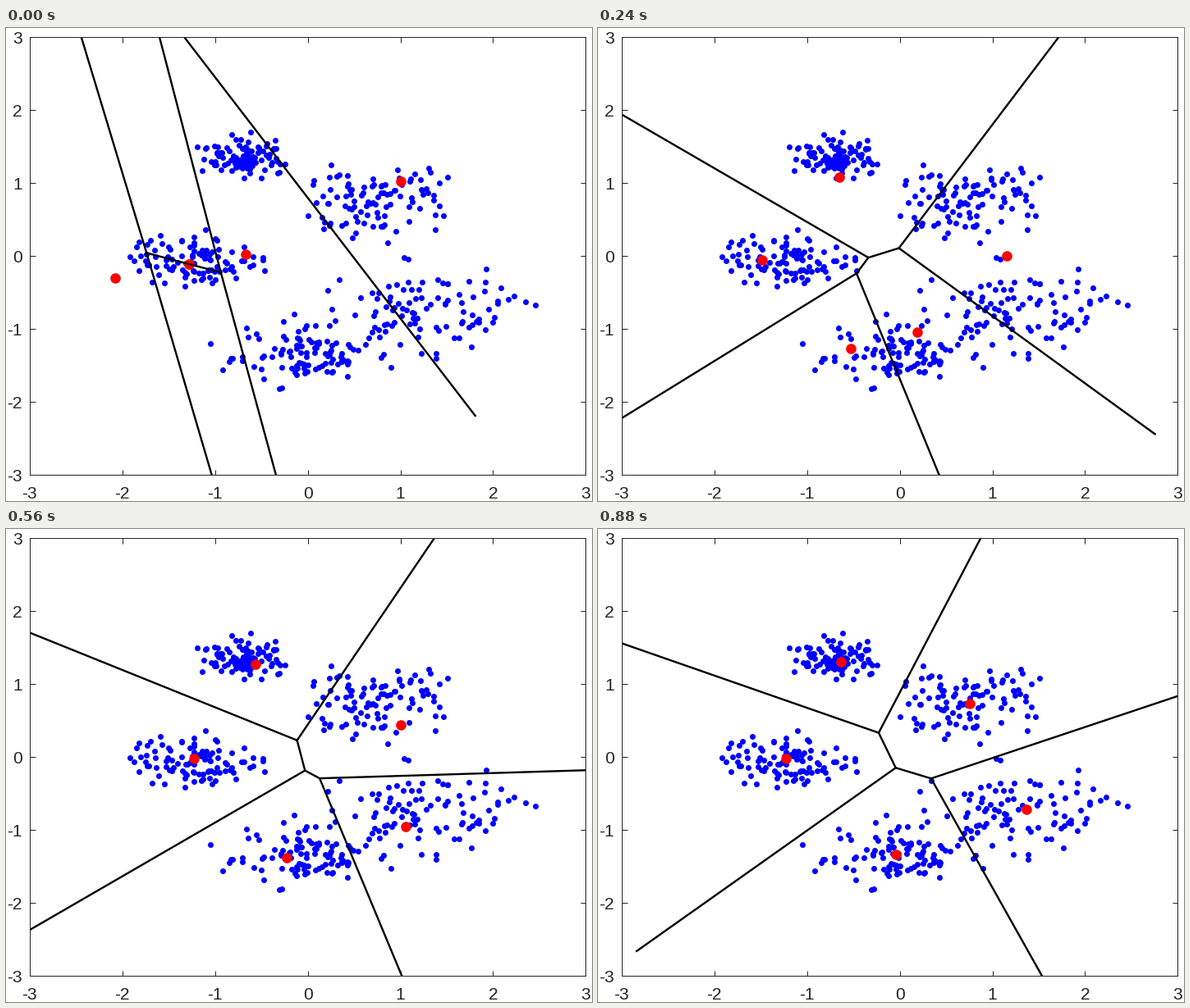
These frames come from a looping animation (714 px wide and 577 px high, 1040 ms). A matplotlib script:

```python
import itertools

import matplotlib.pyplot as plt
import numpy as np
from matplotlib.animation import FuncAnimation

W, H, DPI = 714, 577, 64
PT = 72 / DPI  # points per pixel
LEFT, RIGHT, TOP, BOTTOM = 28.9, 706.4, 10.6, 544.6
LIMIT = 3
STEPS, STEP_MS = 13, 80
INK = "#262626"

# Gaussian blobs: centre x, centre y, spread x, spread y
BLOB_SIZE = 100
BLOBS = [
    (-0.66, 1.36, 0.25, 0.15),
    (-1.21, 0.0, 0.39, 0.2),
    (-0.08, -1.35, 0.43, 0.22),
    (0.72, 0.76, 0.41, 0.24),
    (1.34, -0.7, 0.49, 0.3),
]

# Cluster centres at the key steps; they ease from one key to the next
KEYS = {
    0: [(-2.08, -0.303), (-1.282, -0.113), (-1.284, -0.119), (-0.668, 0.013), (1.0, 1.022)],
    1: [(-1.938, -0.045), (-1.314, 0.152), (-1.261, -0.455), (-0.261, -0.124), (1.004, 0.219)],
    3: [(-1.482, -0.056), (-0.65, 1.073), (-0.527, -1.275), (0.186, -1.045), (1.15, 0.0)],
    5: [(-1.226, -0.028), (-0.544, 1.258), (-0.372, -1.36), (0.593, -1.157), (1.159, 0.124)],
    7: [(-1.226, -0.028), (-0.562, 1.27), (-0.23, -1.382), (1.058, -0.96), (1.004, 0.433)],
    10: [(-1.226, -0.028), (-0.637, 1.303), (-0.044, -1.343), (1.367, -0.719), (0.752, 0.73)],
}


def make_cloud():
    rng = np.random.default_rng(7)
    blobs = []
    for cx, cy, sx, sy in BLOBS:
        unit = rng.normal(size=(2 * BLOB_SIZE, 2))
        unit = unit[np.hypot(*unit.T) < 2.5][:BLOB_SIZE]
        blobs.append(unit * (sx, sy) + (cx, cy))
    return np.concatenate(blobs)


def centres_at(step):
    start = max(key for key in KEYS if key <= step)
    end = min((key for key in KEYS if key > step), default=start)
    a, b = np.array(KEYS[start]), np.array(KEYS[end])
    mix = (step - start) / max(end - start, 1)
    return a + (b - a) * (1 - (1 - mix) ** 2)


def voronoi_edges(sites, reach):
    """Clip the bisector of every pair of sites against all other sites."""
    edges = []
    for i, j in itertools.combinations(range(len(sites)), 2):
        a, b = sites[i], sites[j]
        middle = (a + b) / 2
        along = np.array([a[1] - b[1], b[0] - a[0]]) / np.hypot(*(b - a))
        low, high = -np.inf, np.inf
        for k, c in enumerate(sites):
            if k in (i, j):
                continue
            slope = 2 * along @ (c - a)
            t = (c @ c - a @ a - 2 * middle @ (c - a)) / slope
            if slope > 0:
                high = min(high, t)
            else:
                low = max(low, t)
        if low >= high:
            continue
        if np.isinf(low):
            low = -reach if np.isinf(high) else high - reach
        if np.isinf(high):
            high = low + reach
        edges += [middle + low * along, middle + high * along, (np.nan, np.nan)]
    return np.array(edges)


def label(x, y, value, align):
    fig.text(x / W, 1 - y / H, str(value), ha=align, va="baseline",
             family="Liberation Sans", size=21 * PT, color=INK)


fig = plt.figure(figsize=(W / DPI, H / DPI), dpi=DPI, facecolor="white")
ax = fig.add_axes([LEFT / W, 1 - BOTTOM / H, (RIGHT - LEFT) / W, (BOTTOM - TOP) / H])
ticks = range(-LIMIT, LIMIT + 1)
ax.set(xlim=(-LIMIT, LIMIT), ylim=(-LIMIT, LIMIT), xticks=ticks, yticks=ticks)
ax.tick_params(direction="in", top=True, right=True, labelbottom=False,
               labelleft=False, length=6.5 * PT, width=PT, color=INK)
for spine in ax.spines.values():
    spine.set(linewidth=PT, color=INK)

for value in ticks:
    part = (value + LIMIT) / (2 * LIMIT)
    label(LEFT + part * (RIGHT - LEFT), 574, value, "center")
    label(20, BOTTOM - part * (BOTTOM - TOP) + 8, value, "right")

ax.plot(*make_cloud().T, "o", color="#0000ff", ms=7 * PT, mew=0, zorder=2.1)
centre_dots, = ax.plot([], [], "o", color="#ff0000", ms=12.6 * PT, mew=0, zorder=2.2)
borders, = ax.plot([], [], color="black", lw=2.4 * PT, zorder=2.3,
                   solid_capstyle="butt")


def draw(step):
    sites = centres_at(step)
    reach = np.interp(step, [0, 3], [6.86, 3.77])  # length of open edges
    centre_dots.set_data(*sites.T)
    borders.set_data(*voronoi_edges(sites, reach).T)
    return centre_dots, borders


animation = FuncAnimation(fig, draw, frames=STEPS, interval=STEP_MS,
                          repeat=True, repeat_delay=0)
plt.show()
```
